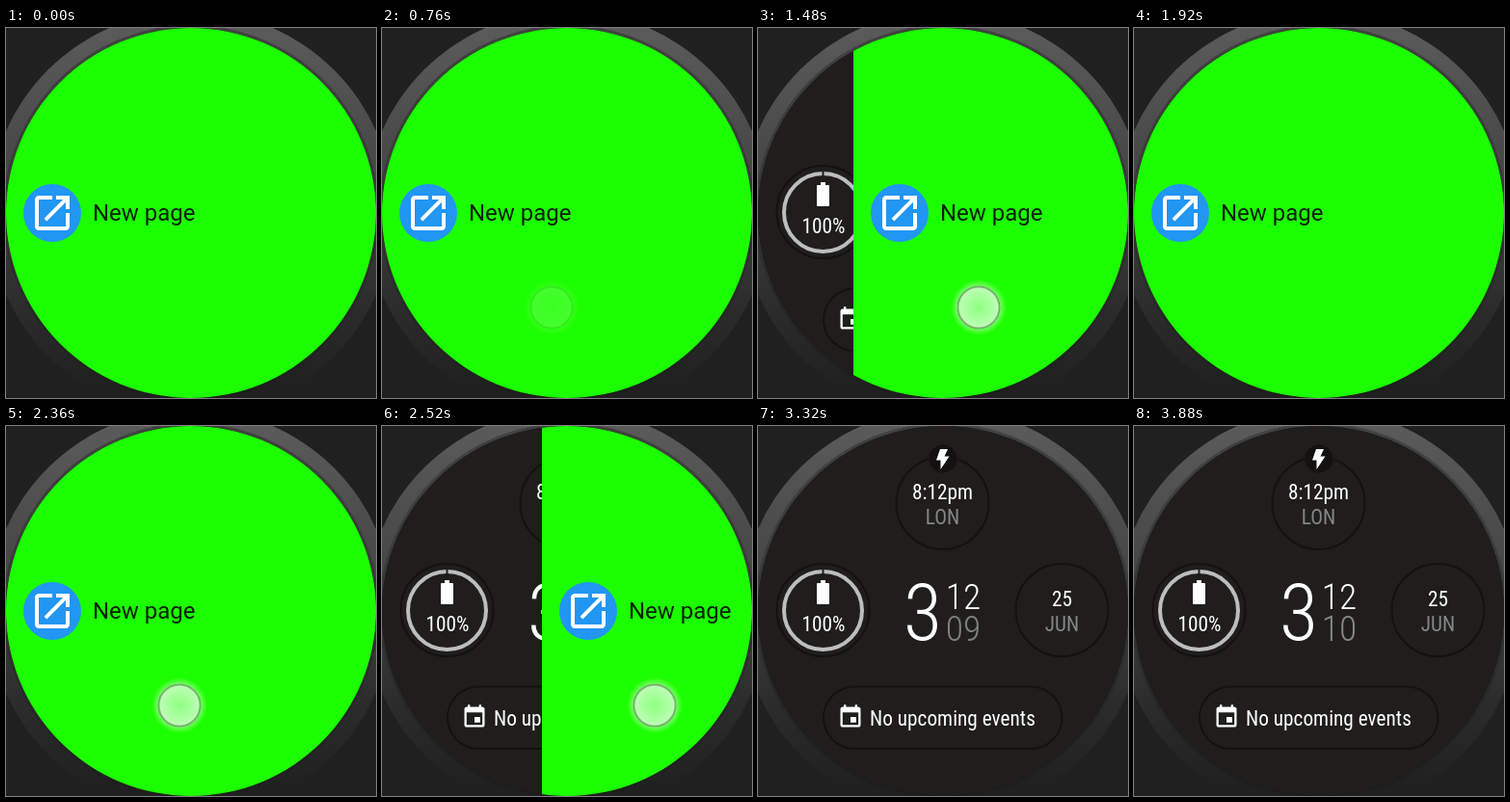
An HTML page that plays this animation: 384 by 384 pixels, repeating every 4.04 s.

```html
<!DOCTYPE html>
<html lang="en">
<head>
<meta charset="utf-8">
<title>Swipe to dismiss</title>
<style>
  html, body { margin: 0; width: 100%; height: 100%; overflow: hidden; background: #202020; }
  svg { display: block; width: 100%; height: 100%; }
  text { font: 24px Roboto, sans-serif; }
  .narrow text { font: 21.3px "Roboto Condensed", Roboto, sans-serif; font-stretch: 75%; fill: #fff; }
  .narrow .mid { text-anchor: middle; }
  .narrow .dim { fill: #868686; }
  .narrow .hour { font-size: 82px; font-weight: 300; }
  .narrow .small { font-size: 37.5px; font-weight: 300; }
  .rim { fill: none; stroke: #131211; stroke-width: 2; }
</style>
</head>
<body>
<svg viewBox="0 0 384 384">
  <defs>
    <linearGradient id="bezel" x1="0" y1="0" x2="0" y2="384" gradientUnits="userSpaceOnUse">
      <stop stop-color="#5a5a5a"/>
      <stop offset=".35" stop-color="#484848"/>
      <stop offset=".75" stop-color="#2c2c2c"/>
      <stop offset=".97" stop-color="#202020"/>
    </linearGradient>
    <linearGradient id="lip" x1="0" y1="0" x2="0" y2="1">
      <stop stop-color="#000" stop-opacity=".28"/>
      <stop offset="1" stop-color="#000" stop-opacity=".05"/>
    </linearGradient>
    <radialGradient id="glow">
      <stop offset=".72" stop-color="#fff" stop-opacity=".45"/>
      <stop offset="1" stop-color="#fff" stop-opacity="0"/>
    </radialGradient>
    <radialGradient id="tip">
      <stop stop-color="#fff" stop-opacity=".5"/>
      <stop offset="1" stop-color="#fff" stop-opacity=".72"/>
    </radialGradient>
    <mask id="hole">
      <rect width="384" height="384" fill="#fff"/>
      <circle cx="0" cy="0" r="22"/>
    </mask>
    <clipPath id="screen"><circle cx="192" cy="192" r="192"/></clipPath>
  </defs>

  <rect width="384" height="384" fill="#202020"/>
  <circle cx="192" cy="192" r="210" fill="url(#bezel)"/>
  <circle cx="192" cy="192" r="195" fill="url(#lip)"/>
  <circle cx="192" cy="192" r="192" fill="#110f0d"/>

  <g clip-path="url(#screen)">
    <g id="face" class="narrow">
      <rect width="384" height="384" fill="#1f1e1c"/>

      <circle class="rim" cx="67.5" cy="191" r="48"/>
      <circle cx="67.5" cy="191.5" r="40.5" fill="none" stroke="#bdbdbd" stroke-width="4"/>
      <path d="M67.5 148v7" stroke="#1f1e1c" stroke-width="2"/>
      <path d="M65 160h5v3h3q1 0 1 1v20q0 1-1 1H62q-1 0-1-1v-20q0-1 1-1h3z" fill="#fff"/>
      <text class="mid" data-at="68,213">100%</text>

      <circle class="rim" cx="191.5" cy="80" r="48"/>
      <circle cx="192" cy="34" r="14.5" fill="#131211"/>
      <path d="M189 24h8l-3.500 7.500h5L189.500 45v-9.500h-4.500z" fill="#fff"/>
      <text class="mid" data-at="191.5,76">8:12pm</text>
      <text class="mid dim" data-at="191.5,102">LON</text>

      <circle class="rim" cx="315.500" cy="191" r="48"/>
      <text class="mid" data-at="315.5,187">25</text>
      <text class="mid dim" data-at="315.5,213">JUN</text>

      <text id="hour" class="mid hour" data-at="171,221.5">3</text>
      <text class="small" data-at="194.7,189.5">12</text>
      <text id="old" class="small dim" data-at="194.7,222.500">09</text>
      <text id="new" class="small dim" data-at="194.7,222.500">10</text>

      <rect class="rim" x="68" y="270.500" width="247.500" height="64.500" rx="32.250"/>
      <path transform="translate(82 288) scale(1.167)" fill="#fff" d="M17 12h-5v5h5v-5zM16 1v2H8V1H6v2H5c-1.110 0-1.990.9-1.990 2L3 19c0 1.100.890 2 2 2h14c1.100 0 2-.9 2-2V5c0-1.100-.9-2-2-2h-1V1h-2zm3 18H5V8h14v11z"/>
      <text data-at="116,311">No upcoming events</text>
    </g>

    <g id="page">
      <rect width="400" height="384" fill="#1cff00"/>
      <circle cx="48" cy="192" r="30" fill="#2196f3"/>
      <path transform="translate(24 168) scale(2)" fill="#fff" d="M19 19H5V5h7V3H5c-1.110 0-2 .9-2 2v14c0 1.100.890 2 2 2h14c1.100 0 2-.9 2-2v-7h-2v7zM14 3v2h3.590l-9.830 9.830 1.410 1.410L19 6.410V10h2V3h-7z"/>
      <text x="90" y="200" fill-opacity=".87">New page</text>
    </g>
  </g>

  <g id="touch">
    <path d="M-29 0a29 29 0 1 0 58 0a29 29 0 1 0-58 0M-22 0a22 22 0 1 0 44 0a22 22 0 1 0-44 0" fill="url(#glow)" fill-rule="evenodd"/>
    <circle r="21.500" fill="url(#tip)"/>
    <circle r="21.500" fill="none" stroke="#777" stroke-opacity=".55" stroke-width="2"/>
  </g>
</svg>
<script>
const LOOP = 4040, STEP = 40;
const $ = id => document.getElementById(id);

// Use one narrow ratio for all labels if no condensed cut is available.
const narrow = $('hour').getComputedTextLength() / 82 > .53 ? .88 : 1;
for (const label of document.querySelectorAll('[data-at]'))
  label.setAttribute('transform', `translate(${label.dataset.at}) scale(${narrow},1)`);

// Linear interpolation through [time, value] points.
function track(t, points) {
  if (t <= points[0][0]) return points[0][1];
  for (let i = 1; i < points.length; i++) {
    const [a, from] = points[i - 1], [b, to] = points[i];
    if (t <= b) return from + (to - from) * (t - a) / (b - a);
  }
  return points[points.length - 1][1];
}

// Released page settles with a decelerating curve over 360 ms.
const settle = (t, start, from, to) =>
  to + (from - to) * Math.max(0, 1 - (t - start) / 360) ** 3.14;

function pageX(t) {
  if (t < 1560) return track(t, [[1000, 0], [1120, 54], [1240, 75], [1480, 99], [1560, 102]]);
  if (t < 2400) return settle(t, 1560, 102, 0);
  if (t < 2720) return track(t, [[2400, 0], [2520, 166], [2720, 174]]);
  return settle(t, 2720, 174, 384);
}

function draw(t) {
  $('page').setAttribute('transform', `translate(${pageX(t)})`);
  $('face').setAttribute('opacity', track(t, [[1160, 0], [1280, 1]]));

  const x = t < 2000
    ? track(t, [[1000, 176], [1120, 205], [1480, 229], [1560, 231]])
    : track(t, [[2400, 180], [2520, 283], [2720, 297], [2840, 383], [2920, 400]]);
  const y = track(t, [[2720, 290], [2840, 274], [2920, 270]]);
  $('touch').setAttribute('transform', `translate(${x},${y})`);
  $('touch').setAttribute('opacity', track(t, [
    [720, 0], [880, 1], [1560, 1], [1680, 0],
    [2160, 0], [2280, 1], [2740, 1], [2840, .65], [2960, 0]]));

  const mix = track(t, [[3240, 0], [3880, 1]]);
  const eased = mix * mix * (3 - 2 * mix);
  $('old').setAttribute('opacity', 1 - eased);
  $('new').setAttribute('opacity', eased);
}

const begin = performance.now();
function tick() {
  const t = (performance.now() - begin) % LOOP;
  draw(Math.floor(t / STEP) * STEP);
  requestAnimationFrame(tick);
}
tick();
</script>
</body>
</html>
```
